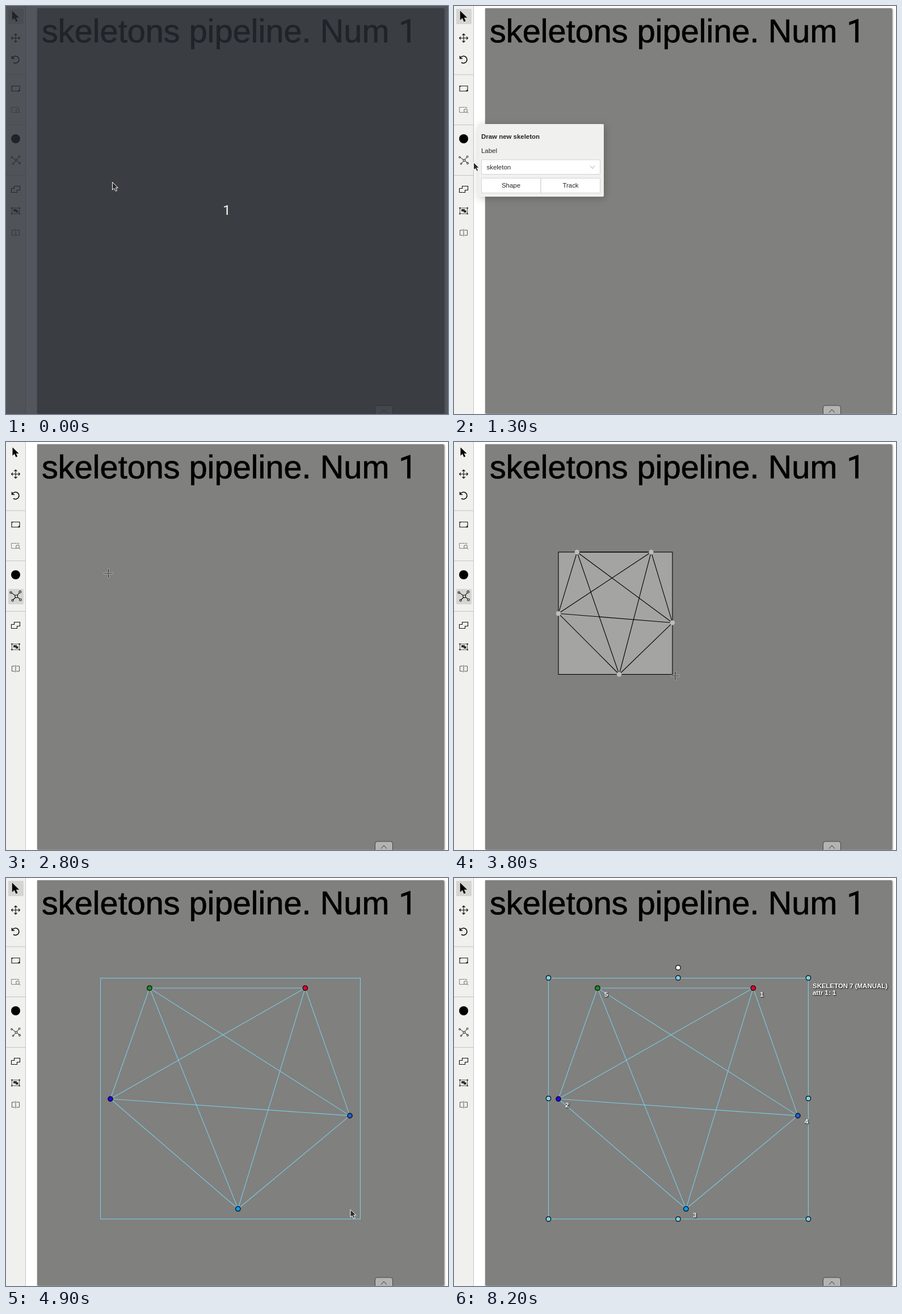
Recreate the animation shown at these times as an HTML page. Size 779x719 px, loop 8300 ms.

```html
<!DOCTYPE html>
<html lang="en">
<head>
<meta charset="utf-8">
<title>Skeleton drawing</title>
<style>
  html, body { margin: 0; width: 100%; height: 100%; overflow: hidden; background: #fff; }
  svg { display: block; }
  text { font: 11.45px "Liberation Sans", Arial, sans-serif; fill: #262626; }
  .bold { font-weight: bold; }
  .title { font-size: 57.7px; fill: #000; stroke: #000; stroke-width: .7; }
  .digit { font-family: Roboto, sans-serif; }
  .icon { fill: none; stroke: #111; stroke-width: 1.1; }
  .thin { stroke: #555; stroke-width: 1; }
  .solid { fill: #000; stroke: none; }
  .field { fill: #fff; stroke: #d4d4d4; }
  .caption text { font-weight: bold; fill: #fff; filter: drop-shadow(1px 1px 1px #000); }
  .draft { fill: none; stroke: #000; stroke-width: 1.1; }
  .final { fill: none; stroke: #78cbe6; stroke-width: 1.1; }
  .dot { stroke: #000; stroke-width: 1.2; }
</style>
</head>
<body>
<svg width="779" height="719" viewBox="0 0 779 719">
  <rect width="779" height="719" fill="#fff"/>
  <rect x="55" y="4" width="716.5" height="714" fill="#80807e" style="filter:drop-shadow(1.5px 1px 1.5px rgba(0,0,0,.7))"/>
  <g style="filter:blur(.5px)">
    <text class="title" x="63" y="64">skeletons pipeline. Num</text>
    <text class="title digit" x="692" y="64">1</text>
  </g>
  <path d="M650.5 720V708q0-4 4-4h23q4 0 4 4v12z" fill="#b3b3b1" stroke="#444"/>
  <path d="M661 716.5l5-5.5 5 5.5" fill="none" stroke="#333"/>

  <rect width="34" height="719" fill="#f0f0ee"/>
  <path d="M34.5 0V719M0 121H34M0 209.5H34M0 298.5H34" stroke="#c4c4c3" fill="none"/>
  <rect id="active" x="4" width="27" height="27" rx="1" fill="#d5d5d3"/>
  <g class="icon">
    <g id="pointerIcon"><path class="solid" d="M-5.5-8.5V6l3.5-3 2.5 5.7 2.6-1.2L.7 2.2H5.5z"/></g>
    <path transform="translate(17 56.5)" d="M-7.5 0H7.5M0-7.5V7.5M-5-2.5L-7.5 0l2.5 2.5M5-2.5L7.5 0 5 2.5M-2.5-5L0-7.5 2.5-5M-2.5 5L0 7.5 2.5 5"/>
    <path transform="translate(17 94.5)" d="M-6.5-6.5v4.5h4.5M-6-2.5A6.2 6.2 0 1 1-4 5" stroke-width="1.6"/>
    <g transform="translate(17 145.5)"><path d="M-7-4.5H7v9H-7z"/><path class="solid" d="M-7-4.5h2.5l-2.5 2zM7 4.5H3.5l3.5-3z"/></g>
    <g class="thin" transform="translate(17 183)"><path d="M1 4.5H-7.5v-9H5.5V-2" stroke-dasharray="2 1"/><circle cx="3.5" cy="1.5" r="3"/><path d="M5.5 3.5L8 6"/></g>
    <circle class="solid" cx="17" cy="234" r="8"/>
    <g id="skeletonIcon" stroke-width=".95"><path d="M-6.5-5.5L1 0 6-6M1 0l-5 5.5M1 0l6 4.500"/>
      <g fill="#f0f0ee"><circle cx="1" r="1.9"/><circle cx="-7" cy="-5.5" r="1.3"/><circle cx="6.500" cy="-6.500" r="1.500"/><circle cx="-4.500" cy="6" r="1.300"/><circle cx="7" cy="5" r="1.500"/></g></g>
    <path transform="translate(17 323)" d="M-2.5-5.5h10v7h-5v4h-10v-7h5z"/>
    <g class="thin" transform="translate(17 361)"><path d="M-6.500-5h13v10h-13z"/><path class="solid" d="M-4-3h6v4h-6zM0-1h4.500v4H0z" opacity=".8"/><path class="solid" d="M-8-6.200h2.500v2.500h-2.500zM5.500-6.200h2.500v2.500h-2.500zM-8 3.700h2.500v2.500h-2.500zM5.500 3.700h2.500v2.500h-2.500z" opacity=".65"/></g>
    <path class="thin" transform="translate(17 399.5)" d="M-1.5-4.5h-5v9h5M1.5-4.5h5v9h-5M0-6.5v13"/>
  </g>

  <g id="popover">
    <path d="M42 210q0-2 2-2h218q2 0 2 2v124q0 2-2 2H44q-2 0-2-2v-57l-5-5 5-5z" fill="#f0f0ee" style="filter:drop-shadow(2px 3px 7px rgba(0,0,0,.22))"/>
    <text class="bold" x="48" y="234">Draw new skeleton</text>
    <text x="48" y="258.700">Label</text>
    <path class="field" d="M48.5 271h209v25.500h-209zM48.500 303.500h104.500v26h-104.500zM153 303.500h104.500v26H153z"/>
    <path d="M240 281.500l4 5 4-5" fill="none" stroke="#aaa"/>
    <text x="57.500" y="287.500">skeleton</text>
    <text x="100.500" y="320" text-anchor="middle">Shape</text>
    <text x="205.500" y="320" text-anchor="middle">Track</text>
  </g>

  <g id="shape"></g>
  <g id="overlay">
    <rect width="779" height="719" fill="#282c34" opacity=".8"/>
    <text class="digit" x="389" y="368" text-anchor="middle" style="font-size:24px;fill:#fffef0">1</text>
  </g>
  <g id="cursor">
    <path id="arrow" d="M0 0V13.500l3.200-2.700 2.500 5 2.500-1.200L5.800 9.800H10z" fill="#2b2b2b" stroke="#fff"/>
    <g id="cross" fill="none">
      <path d="M-8 0H-2M2 0H8M0-8V-2M0 2V8" stroke="#ccc" stroke-width="2.800"/>
      <path d="M-7.500 0H-2M2 0H7.500M0-7.500V-2M0 2V7.500M-.6 0H.6" stroke="#000" stroke-width="1.200"/>
    </g>
    <g id="move" stroke="#eee" stroke-width=".8" fill="#222">
      <path d="M0-8.500L3.500-4.500H1V-1H4.500V-3.500L8.500 0 4.500 3.500V1H1V4.500H3.500L0 8.500-3.500 4.500H-1V1H-4.500V3.500L-8.500 0-4.500-3.500V-1H-1V-4.500H-3.500z"/>
      <circle r="2.500" fill="#777"/>
    </g>
  </g>
</svg>
<script>
const LOOP = 8300, FRAME = 100;
const $ = id => document.getElementById(id);
const show = (id, visible) => $(id).style.display = visible ? '' : 'none';

// Joints as fractions of the drawn box, with label and colour.
const joints = [
  [.8135, 0, 1, '#e6002e'], [0, .502, 2, '#2200f0'], [.533, 1, 3, '#0a9bff'],
  [1, .578, 4, '#2a5cc8'], [.1635, 0, 5, '#228b22']
];

// Keys are [time, x, y].
const cursorPath = [
  [0, 187.5, 310.5], [800, 17, 272], [1100, 17, 272], [1300, 34.5, 275.5], [2000, 100, 316],
  [2300, 100, 316], [2800, 180.5, 231.5], [3200, 184.5, 194], [3400, 184.5, 194],
  [3800, 390, 412], [4200, 607, 585], [5200, 607, 584], [6100, 381, 258],
  [6700, 381, 258], [6800, 380, 257], [7100, 282, 146], [7300, 282, 146], [8200, 53, -18]
];
const cornerPath = [[3400, 184, 194], [3800, 385, 409.5], [4200, 606, 583]];

function along(path, t) {
  const i = path.findIndex(key => key[0] >= t);
  if (i < 0) return path[path.length - 1].slice(1);
  if (i === 0) return path[0].slice(1);
  const a = path[i - 1], b = path[i], p = (t - a[0]) / (b[0] - a[0]);
  return [a[1] + (b[1] - a[1]) * p, a[2] + (b[2] - a[2]) * p];
}

const circle = (x, y, fill, cls = 'dot') => `<circle class="${cls}" cx="${x}" cy="${y}" r="4.2" fill="${fill}"/>`;
const label = (x, y, text) => `<text x="${x}" y="${y}">${text}</text>`;

function skeleton(t) {
  const done = t >= 4900, selected = t >= 5300;
  const [right, bottom] = along(cornerPath, t);
  const left = 184, top = 194, w = right - left, h = bottom - top;
  const points = joints.map(([u, v]) => [left + u * w, top + v * h]);

  let edges = '';
  points.forEach((a, i) => points.slice(i + 1).forEach(b => edges += `M${a}L${b}`));

  let out = done
    ? '<rect class="final" x="166.5" y="176.5" width="458" height="424.5"/>'
    : `<rect x="${left}" y="${top}" width="${w}" height="${h}" fill="#fff" fill-opacity=".28" stroke="#000" stroke-width="1.1"/>`;
  out += `<path class="${done ? 'final' : 'draft'}" d="${edges}"/>`;
  out += points.map(([x, y], i) => circle(x, y, done ? joints[i][3] : '#bdbdbc', done ? 'dot' : '')).join('');
  if (!selected) return out;

  for (const x of [166.5, 395, 624.5])
    for (const y of [176, 388.5, 601])
      if (x !== 395 || y !== 388.5) out += circle(x, y, '#80cfe8');
  out += circle(395, 158, '#fff');
  const captions = points.map(([x, y], i) => label(x + 12, y + 14.5, joints[i][2])).join('')
    + label(632, 194, 'SKELETON 7 (MANUAL)') + label(632, 206, 'attr 1: 1');
  return out + `<g class="caption">${captions}</g>`;
}

function render(time) {
  const t = Math.floor(time % LOOP / FRAME) * FRAME;
  const drawing = t >= 2400 && t < 4900;
  const moving = t >= 5300 && t < 7000;

  $('overlay').style.opacity = Math.max(0, 1 - t / 800);
  show('popover', t >= 1000 && t < 2600);
  $('popover').style.opacity = t < 2400 ? 1 : (2600 - t) / 300;

  $('active').setAttribute('y', drawing ? 259 : 5);
  $('pointerIcon').setAttribute('transform', `translate(17 18) scale(${drawing ? 1 : 1.12})`);
  $('skeletonIcon').setAttribute('transform', `translate(17 272) scale(${drawing ? 1.2 : 1})`);

  $('shape').innerHTML = t >= 3500 ? skeleton(t) : '';

  show('cross', drawing);
  show('move', moving);
  show('arrow', !drawing && !moving);
  $('cursor').setAttribute('transform', `translate(${along(cursorPath, t)})`);
}

const start = performance.now();
function tick() {
  render(performance.now() - start);
  requestAnimationFrame(tick);
}
tick();
</script>
</body>
</html>
```
